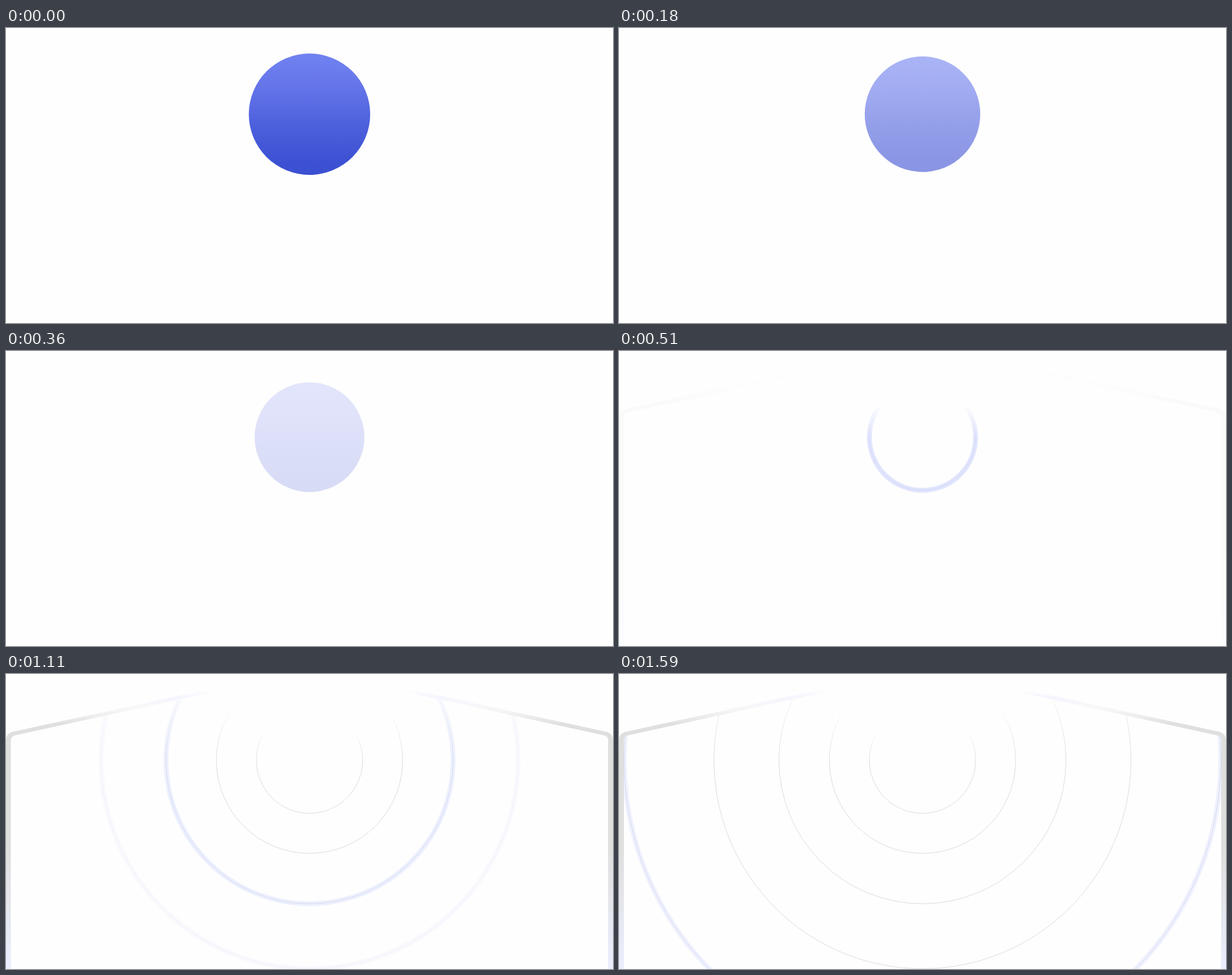
Write an HTML page without scripts that moves like this. It is 1000 px wide and 486 px high and loops after 1.8 s.

```html
<!DOCTYPE html>
<html lang="en">
<head>
<meta charset="utf-8">
<title>Ripple</title>
<style>
  /* elapsed loop time in ms; every part derives its state from it */
  @property --t { syntax: "<number>"; inherits: true; initial-value: 0; }
  @keyframes run { from { --t: 0; } to { --t: 1800; } }

  html, body { margin: 0; width: 100%; height: 100%; overflow: hidden; background: #fefefe; }
  svg { display: block; width: 100%; height: 100%; animation: run 1800ms linear infinite; }
  circle { cx: 500px; cy: 142px; }

  .ball {
    fill: url(#blue);
    r: calc(100px - var(--t) * 12px / 450);
    opacity: calc(1 - var(--t) / 450);
  }

  .frame { fill: url(#edge); opacity: calc((var(--t) - 450) / 440); }

  .ring { --x: calc(var(--t) - var(--d)); mask: url(#fade); }
  .ring circle { r: var(--r); fill: none; stroke-width: 1px; }
  .line { stroke: #dcdcdc; opacity: calc(var(--x) / 60); }
  .glow { opacity: min(var(--x) / 60, 1 - (var(--x) - 100) / 320); }
  .halo { stroke: #e0e5fd; }
  .ring .halo { stroke-width: 8px; }
  .core { stroke: #d0d5f8; }
</style>
</head>
<body>
<svg viewBox="0 0 1000 486" preserveAspectRatio="none">
  <defs>
    <linearGradient id="blue" x2="0" y2="1">
      <stop stop-color="#7082f0"/>
      <stop offset=".25" stop-color="#6676ea"/>
      <stop offset=".6" stop-color="#4c5fdc"/>
      <stop offset=".9" stop-color="#3c50d3"/>
      <stop offset="1" stop-color="#3b4fd2"/>
    </linearGradient>
    <linearGradient id="edge" gradientUnits="userSpaceOnUse" x1="0" y1="0" x2="0" y2="486">
      <stop offset=".056" stop-color="#f4f5fe" stop-opacity="0"/>
      <stop offset=".08" stop-color="#f4f5fe"/>
      <stop offset=".107" stop-color="#f8f8fb"/>
      <stop offset=".126" stop-color="#f5f5f5"/>
      <stop offset=".148" stop-color="#ebebeb"/>
      <stop offset=".17" stop-color="#dfdfdf"/>
      <stop offset=".6" stop-color="#dfdfdf"/>
      <stop offset=".78" stop-color="#e4e6ec"/>
      <stop offset="1" stop-color="#eaeefe"/>
    </linearGradient>
    <linearGradient id="rise" x2="0" y2="1">
      <stop stop-color="#fff" stop-opacity="0"/>
      <stop offset=".333" stop-color="#fff"/>
    </linearGradient>
    <mask id="fade" maskContentUnits="objectBoundingBox">
      <rect x="-.1" y=".2" width="1.2" height=".9" fill="url(#rise)"/>
    </mask>
    <clipPath id="inside">
      <path d="M8 486V104L15 101 500-4 985 101 992 104V486Z"/>
    </clipPath>
    <path id="side" d="M0 486V110Q0 97.500 12 95L335 25V31L15 101Q8 102.500 8 110V486Z"/>
  </defs>

  <circle class="ball"/>

  <g class="frame">
    <use href="#side"/>
    <use href="#side" transform="matrix(-1 0 0 1 1000 0)"/>
  </g>

  <g clip-path="url(#inside)">
    <g class="ring" style="--r: 87.5px; --d: 400">
      <circle class="line"/>
      <g class="glow"><circle class="halo"/><circle class="core"/></g>
    </g>
    <g class="ring" style="--r: 153.5px; --d: 640">
      <circle class="line"/>
      <g class="glow"><circle class="halo"/><circle class="core"/></g>
    </g>
    <g class="ring" style="--r: 236.5px; --d: 875">
      <circle class="line"/>
      <g class="glow"><circle class="halo"/><circle class="core"/></g>
    </g>
    <g class="ring" style="--r: 343.5px; --d: 1100">
      <circle class="line"/>
      <g class="glow"><circle class="halo"/><circle class="core"/></g>
    </g>
    <g class="ring" style="--r: 491.5px; --d: 1340">
      <circle class="line"/>
      <g class="glow"><circle class="halo"/><circle class="core"/></g>
    </g>
  </g>
</svg>
</body>
</html>
```
